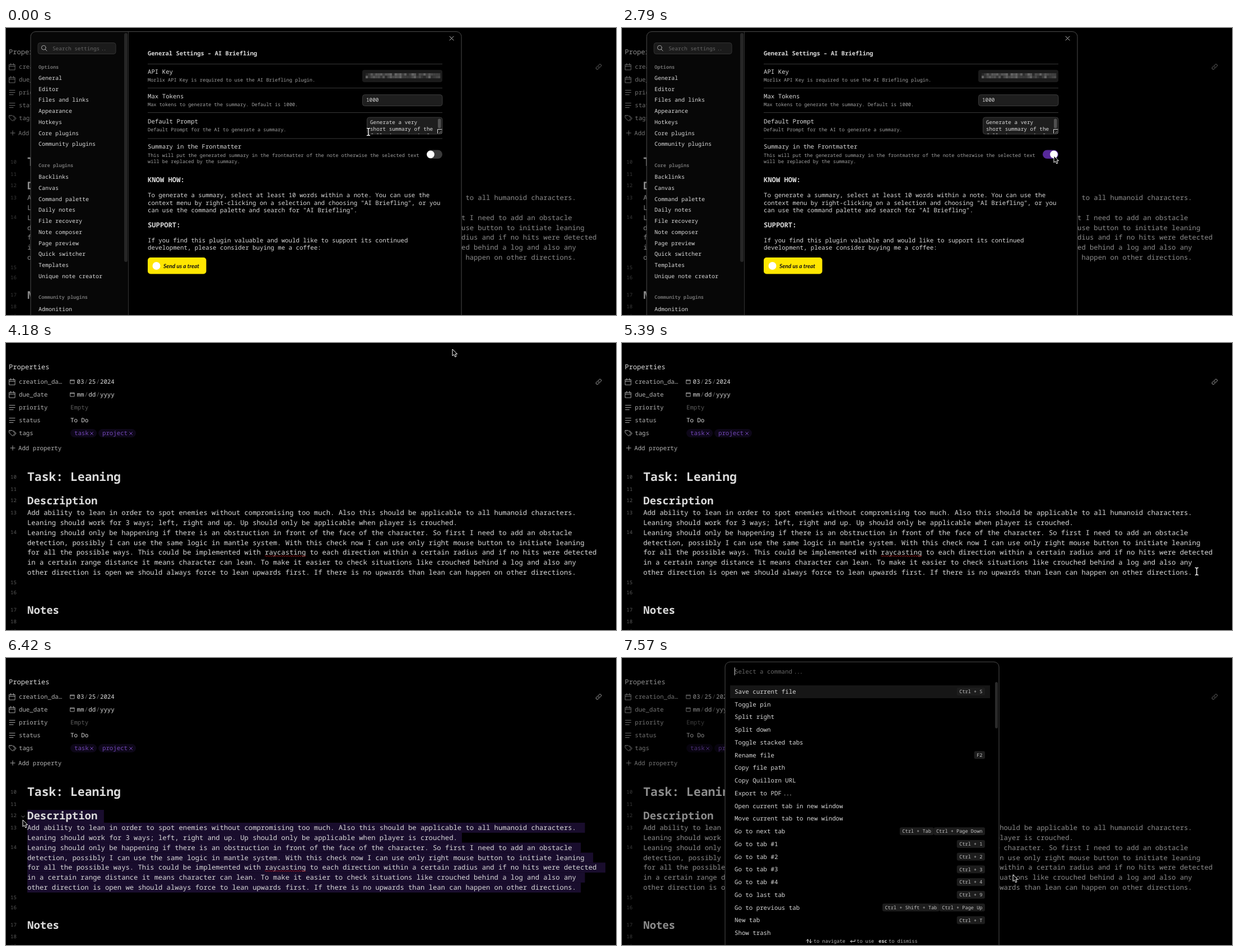
Recreate the animation shown at these times as an HTML page. Size 1089 by 514 pixels, loop 8000 ms.

```html
<!DOCTYPE html>
<html lang="en">
<head>
<meta charset="utf-8">
<title>Summary settings</title>
<style>
  html, body { margin: 0; width: 100%; height: 100%; overflow: hidden; background: #000; }
  svg { display: block; width: 100vw; height: 100vh; }
  text { font-family: "Noto Sans Mono", "DejaVu Sans Mono", monospace; white-space: pre; text-rendering: geometricPrecision; }
  .icon { fill: none; stroke-width: 1; stroke-linecap: round; stroke-linejoin: round; }
</style>
</head>
<body>
<svg id="stage" viewBox="0 0 1089 514"></svg>
<script>
const LOOP = 8000, TICK = 80.3;
const ADVANCE = 0.6;
const TEXT = '#dadada', MUTED = '#a2a2a2', FAINT = '#666';
const UI = 10.72, SMALL = 8.6, INPUT = 9.35, BODY = 12.2;

const text = (x, y, str, size = UI, fill = TEXT, attrs = '') =>
  `<text x="${x}" y="${y}" font-size="${size}" fill="${fill}" ${attrs}>${str}</text>`;
const rect = (x, y, w, h, fill, r = 0, stroke = 'none', attrs = '') =>
  `<rect x="${x}" y="${y}" width="${w}" height="${h}" rx="${r}" fill="${fill}" stroke="${stroke}" ${attrs}/>`;
const icon = (x, y, d, color = MUTED, width = 1) =>
  `<path class="icon" transform="translate(${x} ${y})" d="${d}" style="stroke:${color};stroke-width:${width}"/>`;
const column = (x, y, gap, items, size, fill) =>
  items.map((s, i) => text(x, y + gap * i, s, size, fill)).join('');
const cross = (x, y, r, color) => icon(x, y, `M${-r} ${-r}L${r} ${r}M${r} ${-r}L${-r} ${r}`, color);
const shade = () => rect(0, 0, 1089, 514, '#000', 0, 'none', 'opacity=".36"');
const BOLD = 'font-weight="700"', SEMI = 'font-weight="600"';

// Text followed by a tightly set ellipsis.
const ellipsis = (x, y, str, size, fill, n = 3) =>
  text(x, y, str, size, fill) +
  text(x + (str.length * ADVANCE + 0.25) * size, y, '.'.repeat(n), size, fill, 'letter-spacing="-1.3"');

const LEFT = 38, CHAR = BODY * ADVANCE, ROW = 17.85, FIRST = 295;
const paragraph = [
  'Add ability to lean in order to spot enemies without compromising too much. Also this should be applicable to all humanoid characters.',
  'Leaning should work for 3 ways; left, right and up. Up should only be applicable when player is crouched.',
  'Leaning should only be happening if there is an obstruction in front of the face of the character. So first I need to add an obstacle',
  'detection, possibly I can use the same logic in mantle system. With this check now I can use only right mouse button to initiate leaning',
  'for all the possible ways. This could be implemented with raycasting to each direction within a certain radius and if no hits were detected',
  'in a certain range distance it means character can lean. To make it easier to check situations like crouched behind a log and also any',
  'other direction is open we should always force to lean upwards first. If there is no upwards than lean can happen on other directions.'
];
const rows = [
  { top: 272, height: 23, char: 11.4, length: 11, pad: 1 },
  ...paragraph.map((s, i) => ({
    top: FIRST + ROW * i, height: ROW, char: CHAR, length: s.length, pad: i === 1 || i === 6 ? 1 : 2
  }))
];
const rowEnd = r => LEFT + r.char * (r.length + r.pad);

const CALENDAR = 'M-5 -4H5V5.5H-5ZM-5 -1H5M-2.5 -6V-3M2.5 -6V-3';
const LINES = 'M-5 -4H5M-5 0H5M-5 4H2';
const TAGS = 'M-5 -5H0L5 0L0.5 5L-5 -0.5ZM2.5 -4.5L7 0.2L3 5M-2.8 -2.7h.2';
const LINK = 'M-1 1.2A2.3 2.3 0 0 0 2 1.2L4 -.8A2.2 2.2 0 0 0 .8 -4L0 -3.2M1 -1.2A2.3 2.3 0 0 0 -2 -1.2L-4 .8A2.2 2.2 0 0 0 -.8 4L0 3.2';
const BEAM = 'M-2.5 -6.5Q0 -6.5 0 -5Q0 -6.5 2.5 -6.5M0 -5V5M-2.5 6.5Q0 6.5 0 5Q0 6.5 2.5 6.5';

function dateField(y, parts) {
  const fills = [TEXT, FAINT, TEXT, FAINT, TEXT];
  return icon(118.5, y - 4, 'M-3.5 -3H3.5V3.8H-3.5ZM-3.5 -1.5H3.5', '#999') +
    [126.5, 140, 147.3, 161, 168].map((x, i) => text(x, y, parts[i], UI, fills[i])).join('');
}

function noteProperties() {
  const keys = ['creation_da…', 'due_date', 'priority', 'status', 'tags'];
  const icons = [CALENDAR, CALENDAR, LINES, LINES, TAGS];
  const tag = (x, w, name) => rect(x, 154, w, 15, '#0d0718', 7.5) +
    text(x + 7, 164.5, name, UI, '#7448b8') + cross(x + w - 9, 162, 2.4, '#7448b8');
  return text(5, 46.8, 'Properties', 12.1, TEXT, 'font-weight="500"') +
    keys.map((k, i) => icon(11, 69.5 + 23 * i, icons[i]) + text(23, 73 + 23 * i, k, UI, '#b3b3b3')).join('') +
    dateField(73, ['03', '/', '25', '/', '2024']) +
    dateField(96, ['mm', '/', 'dd', '/', 'yyyy']) +
    text(115, 118.5, 'Empty', UI, '#5c5c5c') + text(115, 142, 'To Do') +
    tag(115, 47, 'task') + tag(165, 67, 'project') +
    icon(12, 188, 'M-4 0H4M0 -4V4') + text(22, 191.5, 'Add property', UI, '#b3b3b3') +
    icon(1058, 69.5, LINK, '#a8a8a8');
}

function noteBody() {
  const numbers = [242.5, 265, 285, 306.5, 342, 431.5, 449.5, 481, 502, 519.5];
  const wordX = LEFT + paragraph[4].indexOf('raycasting') * CHAR;
  const wave = `M${wordX} 381.5` + 'q1 -2 2 0t2 0'.repeat(18);
  return numbers.map((y, i) => text(8, y, 10 + i, 9, '#5a5a5a')).join('') +
    text(LEFT, 247, 'Task: Leaning', 21.4, TEXT, BOLD) +
    text(LEFT, 289, 'Description', 19, TEXT, BOLD) +
    text(LEFT, 485, 'Notes', 19, TEXT, BOLD) +
    column(LEFT, 308, ROW, paragraph, BODY, TEXT) +
    icon(0, 0, wave, '#c81414');
}

function maskedKey() {
  let seed = 7, out = '';
  const random = () => (seed = seed * 16807 % 2147483647) / 2147483647;
  for (let x = 642; x < 771; x += 4.3)
    for (let y = 81; y < 90; y += 4.5) {
      const g = 40 + random() * 65 | 0;
      out += rect(x, y, 4.4, 4.6, `rgb(${g},${g},${g})`);
    }
  return out;
}

function settingsSidebar() {
  const heading = (y, s) => text(58, y, s, 8.65, '#707070', SEMI);
  return rect(211, 9, 6, 410, '#262626', 3) +
    rect(57, 26.5, 139, 20, '#1b1b1b', 4, '#333') +
    icon(68, 36, 'M3 -.8A3.8 3.8 0 1 1 -4.6 -.8A3.8 3.8 0 1 1 3 -.8M2 2L5 5', '#aaa') +
    ellipsis(83, 39.7, 'Search settings', INPUT, FAINT, 2) +
    heading(72.5, 'Options') +
    column(58, 93, 19.7, ['General', 'Editor', 'Files and links', 'Appearance', 'Hotkeys', 'Core plugins', 'Community plugins'], 10, TEXT) +
    heading(249.3, 'Core plugins') +
    column(58, 270, 19.75, ['Backlinks', 'Canvas', 'Command palette', 'Daily notes', 'File recovery', 'Note composer', 'Page preview', 'Quick switcher', 'Templates', 'Unique note creator'], 10, TEXT) +
    heading(485.2, 'Community plugins') + text(58, 506.5, 'Admonition', 10);
}

function settingsContent() {
  const x = 253;
  const setting = (y, name, ...about) => text(x, y, name) + column(x, y + 14.4, 10.8, about, SMALL, MUTED);
  const field = (fx, y, h) => rect(fx, y, 779 - fx, h, '#1e1e1e', 4, '#3a3a3a');
  return text(x, 48.8, 'General Settings – AI Briefling', 10.5, TEXT, SEMI) +
    [64.5, 107.5, 151.5, 198].map(y => rect(x, y - .5, 526, 1, '#383838')).join('') +
    setting(81.8, 'API Key', 'Morlix API Key is required to use the AI Briefling plugin.') +
    setting(125.5, 'Max Tokens', 'Max tokens to generate the summary. Default is 1000.') +
    setting(170.8, 'Default Prompt', 'Default Prompt for the AI to generate a summary.') +
    setting(216.3, 'Summary in the Frontmatter',
      'This will put the generated summary in the frontmatter of the note otherwise the selected text',
      'will be replaced by the summary.') +
    rect(636, 75, 143, 22, '#1b1b1b', 4) + maskedKey() +
    field(636.5, 119.5, 20) + text(643, 132.3, '1000', INPUT) +
    field(644.5, 160, 30) +
    `<clipPath id="area"><rect x="645" y="161" width="126" height="29"/></clipPath><g clip-path="url(#area)">` +
    column(650, 171.7, 11.9, ['Generate a very', 'short summary of the', 'following note in 2'], INPUT, TEXT) + '</g>' +
    rect(771, 162.5, 5.5, 17, '#505050', 2.5) +
    icon(770.5, 181.5, 'M0 7V0H7.5', '#ddd') + icon(778, 189, 'M-5 0L0 -5M-2 0L0 -2', '#888') +
    text(x, 276.3, 'KNOW HOW:', BODY, TEXT, SEMI) +
    column(x, 303, 13.6, [
      'To generate a summary, select at least 10 words within a note. You can use the',
      'context menu by right-clicking on a selection and choosing "AI Briefling", or you',
      'can use the command palette and search for "AI Briefling".'], 10.75, TEXT) +
    text(x, 357.3, 'SUPPORT:', BODY, TEXT, SEMI) +
    column(x, 383.5, 13.8, [
      'If you find this plugin valuable and would like to support its continued',
      'development, please consider buying me a coffee:'], 10.75, TEXT) +
    rect(x, 411, 104.5, 29.5, '#ffe600', 5) + '<circle cx="268.5" cy="426" r="7" fill="#fff"/>' +
    text(281, 430, 'Send us a treat', 10.2, '#0d0c12', 'font-style="italic" font-weight="700" style="font-family:Lato,sans-serif"');
}

function settings() {
  return shade() +
    rect(44, 6.5, 769, 540, '#000', 9) +
    '<path d="M218.5 6.5H53A9 9 0 0 0 44 15.5V514H218.5Z" fill="#070707"/>' +
    rect(218, 6.5, 1, 510, '#333') +
    rect(44, 6.5, 769, 540, 'none', 9, '#4c4c4c') +
    cross(795.5, 18.5, 3.5, '#c0c0c0') + settingsSidebar() + settingsContent() +
    rect(751, 218.5, 28, 15.5, '#3a3a3a', 7.75, 'none', 'id="track"') +
    '<circle id="knob" cy="226.4" r="6.8" fill="#fff"/>';
}

function palette() {
  const commands = [
    ['Save current file', 'Ctrl + S'], ['Toggle pin'], ['Split right'], ['Split down'],
    ['Toggle stacked tabs'], ['Rename file', 'F2'], ['Copy file path'], ['Copy Quillorn URL'],
    ['Export to PDF...'], ['Open current tab in new window'], ['Move current tab to new window'],
    ['Go to next tab', 'Ctrl + Tab', 'Ctrl + Page Down'],
    ['Go to tab #1', 'Ctrl + 1'], ['Go to tab #2', 'Ctrl + 2'], ['Go to tab #3', 'Ctrl + 3'],
    ['Go to tab #4', 'Ctrl + 4'], ['Go to last tab', 'Ctrl + 9'],
    ['Go to previous tab', 'Ctrl + Shift + Tab', 'Ctrl + Page Up'],
    ['New tab', 'Ctrl + T'], ['Show trash']
  ];
  const command = ([name, ...keys], i) => {
    const y = 60 + 22.75 * i;
    const label = name.endsWith('...') ? ellipsis : text;
    let right = 648, out = label(201, y + 3.8, name.replace('...', ''), 10.75, TEXT);
    for (const key of keys.reverse()) {
      const w = key.length * SMALL * ADVANCE + 9;
      out += rect(right - w, y - 7, w, 14, '#1d1d1d', 3) + text(right - w + 4.5, y + 3, key, SMALL, '#c4c4c4');
      right -= w;
    }
    return out;
  };
  return shade() +
    rect(184, 7, 489, 540, '#000', 9, '#4c4c4c') +
    ellipsis(201, 27.7, 'Select a command', UI, FAINT) +
    rect(200.7, 17, 1, 14, '#ddd') + rect(193, 49, 464, 23, '#161616') +
    rect(666, 43, 5, 83, '#2a2a2a', 2.5) + commands.map(command).join('') +
    icon(334, 507, 'M-2.5 3V-3M-5 -.5L-2.5 -3L0 -.5M2.5 -3V3M0 .5L2.5 3L5 .5', '#ddd') +
    text(342, 510, 'to navigate', SMALL, '#b5b5b5') +
    icon(412, 507, 'M4 -2.5V.5H-4M-1.8 -1.7L-4 .5L-1.8 2.7', '#ddd') +
    text(419, 510, 'to use', SMALL, '#b5b5b5') +
    text(458, 510, 'esc', SMALL, '#ddd', BOLD) + text(476, 510, 'to dismiss', SMALL, '#b5b5b5');
}

const stage = document.getElementById('stage');
stage.innerHTML =
  '<g id="selection"></g>' + noteProperties() + noteBody() +
  '<g id="fold">' + icon(30.5, 284, 'M-2.5 -1.2L0 1.3L2.5 -1.2', '#888') + '</g>' +
  rect(0, 0, 1, ROW, TEXT, 0, 'none', 'id="caret"') +
  `<g id="settings">${settings()}</g><g id="palette">${palette()}</g>` +
  '<path id="arrow" d="M0 0V12L2.8 9.6L4.8 14L6.9 13L5 8.8H8.6Z" fill="#000" stroke="#fff"/>' +
  `<g id="beam">${icon(0, 0, BEAM, '#000', 3)}${icon(0, 0, BEAM, '#fff', 1.4)}</g>`;
const el = Object.fromEntries([...stage.querySelectorAll('[id]')].map(n => [n.id, n]));

// Pointer stops: tick, x, y
const stops = [
  [0, 647, 186], [5, 585, 200], [6, 585, 200], [11, 525, 214], [14, 525, 214], [21, 478, 221],
  [22, 478, 221], [26, 660, 240], [29, 776, 240], [30, 776, 240], [32, 771, 229], [39, 771, 229],
  [43, 786, 110], [47, 797, 11], [54, 797, 11], [57, 800, 414], [58, 800, 414], [61, 936, 404],
  [62, 936, 404], [67, 1026, 409], [69, 1026, 409], [72, 491, 358], [73, 433, 357], [76, 200, 325],
  [79, 34, 291], [80, 30, 290], [84, 360, 400], [87, 360, 400], [91, 698, 388], [100, 698, 388]
];

function pointerAt(tick) {
  const i = Math.max(1, stops.findIndex(s => s[0] >= tick));
  const [t0, x0, y0] = stops[i - 1], [t1, x1, y1] = stops[i];
  const p = (tick - t0) / (t1 - t0);
  return { x: x0 + (x1 - x0) * p, y: y0 + (y1 - y0) * p };
}

const show = (node, on) => node.setAttribute('display', on ? 'inline' : 'none');

function drawSelection(tick) {
  const selected = tick >= 70 && tick < 94;
  show(el.selection, selected);
  show(el.caret, tick >= 70 && tick < 80);
  // The selection head trails the pointer by one tick.
  const { x, y } = pointerAt(Math.min(tick, 80) - 1);
  const head = y < FIRST ? 0 : Math.min(7, 1 + Math.floor((y - FIRST) / ROW));
  const row = rows[head];
  const col = Math.max(0, Math.min(row.length, Math.round((x - LEFT) / row.char)));
  const headX = LEFT + col * row.char;
  el.caret.setAttribute('x', headX - .5);
  el.caret.setAttribute('y', row.top);
  if (selected) el.selection.innerHTML = rows.slice(head).map((r, i) => {
    const start = i ? LEFT : headX;
    return rect(start, r.top, rowEnd(r) - start, r.height + .1, '#190d2d');
  }).join('');
}

function render(time) {
  const tick = Math.floor((time + 25) / TICK);
  const { x, y } = pointerAt(tick);
  const inNote = tick >= 52 && tick < 94;
  const beam = tick === 0 || (inNote && y > 225 && x > 36);
  show(el.settings, tick < 52);
  show(el.palette, tick >= 94);
  show(el.fold, tick >= 76 && tick < 94 && y > 270 && y < 298);
  show(el.arrow, !beam);
  show(el.beam, beam);
  for (const node of [el.arrow, el.beam]) node.setAttribute('transform', `translate(${x} ${y})`);

  const on = Math.max(0, Math.min(1, (tick - 32) / 2));
  el.knob.setAttribute('cx', 758 + 13 * on);
  el.track.setAttribute('fill', on > 0 ? '#57299a' : '#3a3a3a');
  drawSelection(tick);
}

const begin = performance.now();
function loop() {
  render((performance.now() - begin) % LOOP);
  requestAnimationFrame(loop);
}
loop();
</script>
</body>
</html>
```
